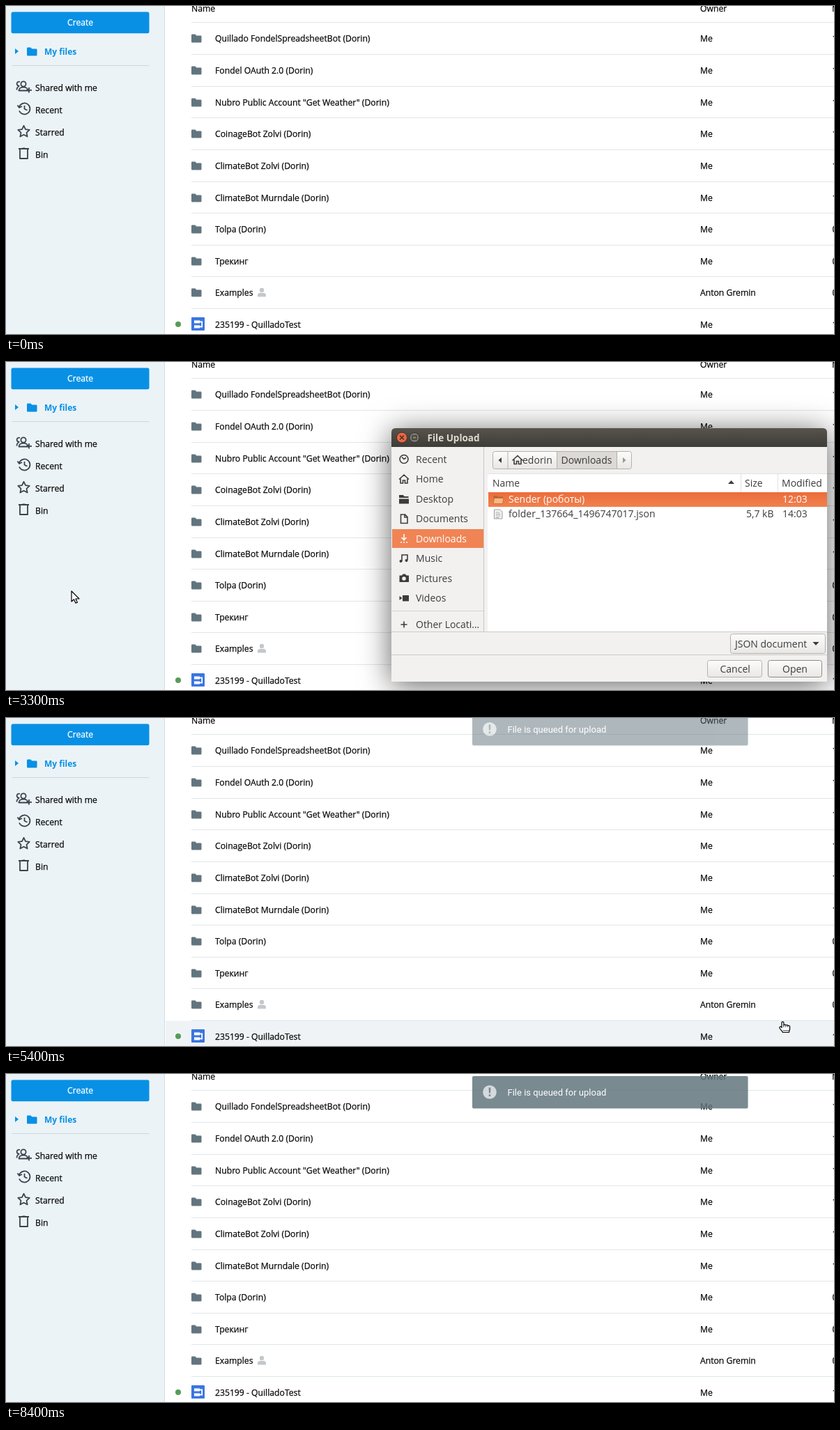
Recreate the animation shown at these times as an HTML page. Size 1188 px wide and 471 px high, loop 9 s.

```html
<!DOCTYPE html>
<html lang="en">
<head>
<meta charset="utf-8">
<title>Upload from file</title>
<style>
  html, body { margin: 0; width: 100%; height: 100%; overflow: hidden; background: #fff; }
  svg { display: block; width: 1188px; height: 471px; }
  text { font: 12.2px "Open Sans", "Noto Sans", sans-serif; color: #0a0a0a; fill: currentColor; stroke: currentColor; stroke-width: .25; white-space: pre; }
  .bold { font-weight: 700; font-size: 12px; color: #0890e5; stroke-width: 0; }
  .white { color: #fff; }
  .line { fill: none; stroke: #39434a; stroke-width: 1.8; stroke-linejoin: round; }
  .solid { fill: #39434a; }
  #menu text { color: #3c464c; }
  #menuBox { filter: drop-shadow(0 2px 3px rgba(0, 0, 0, .32)); }
  #dialogBox { filter: drop-shadow(0 5px 22px rgba(0, 0, 0, .62)); }
  #dialog text { font-size: 14px; color: #3c3c3c; stroke-width: 0; }
  #dialog .title { font-weight: 700; font-size: 13.5px; color: #dfdbd2; }
  #dialog .sel text, #dialog text.white { color: #fff; }
  .btn { fill: url(#btnFill); stroke: #b5b0aa; }
  .gtk { fill: none; stroke: #3c3c3c; stroke-width: 1.6; }
  #toast text { font: 13px Roboto, sans-serif; color: #fff; stroke-width: 0; }
</style>
</head>
<body>
<svg viewBox="0 0 1188 471">
  <defs>
    <linearGradient id="bar" x2="0" y2="1"><stop stop-color="#57544c"/><stop offset="1" stop-color="#3e3c37"/></linearGradient>
    <linearGradient id="btnFill" x2="0" y2="1"><stop stop-color="#fcfcfb"/><stop offset="1" stop-color="#e9e7e5"/></linearGradient>
    <linearGradient id="pick" x2="0" y2="1"><stop stop-color="#ec6c3a"/><stop offset="1" stop-color="#f0814f"/></linearGradient>
    <clipPath id="places"><path d="M554 122h132v265H554z"/></clipPath>
    <path id="folder" d="M0 1.2Q0 0 1.2 0H5.5L7.2 2H13.3Q14.5 2 14.5 3.2V10.8Q14.5 12 13.3 12H1.2Q0 12 0 10.8z"/>
    <path id="process" d="M0 0H11V5H0zM0 9H11V14H0zM11 2.5H15V11.5H11"/>
  </defs>

  <rect id="rowHover" x="229" width="959" height="44.6" fill="#eff3f6"/>
  <g id="list"></g>

  <g id="sidebar">
    <path d="M0 0h228v471H0z" fill="#ebf3f7"/>
    <path d="M227.5 0v471" stroke="#d3dde2"/>
    <rect id="create" x="7.5" y="8.5" width="198" height="30.7" rx="2.5"/>
    <text class="white" x="88" y="28.3">Create</text>
    <path d="M13 61l5 4-5 4z" fill="#0890e5"/>
    <use href="#folder" x="30" y="59.5" fill="#0890e5"/>
    <text class="bold" x="55" y="70">My files</text>
    <path d="M8 85.5h197" stroke="#cbd8de"/>
    <g class="line">
      <circle cx="25" cy="112" r="3.6"/>
      <path d="M18.5 121.5c0-6.5 13-6.5 13 0zM20 109a3 3 0 1 0-.5 5.5M15.5 120.5c0-3 1-4.5 3-5M33 117v7.5M29 120.8h8"/>
      <path d="M19 150.5a8 8 0 1 0 0-6M16.5 142.5l2.5 3.5 4-2M26.5 143v4.800l4 2"/>
      <path id="star"/>
      <path d="M18 205h15M20 205v14h11v-14M23.5 204.5h4"/>
    </g>
  </g>

  <g id="menu">
    <rect id="menuBox" x="8" y="43" width="197" height="310" rx="2" fill="#fff"/>
    <rect id="itemHover" x="8" width="197" height="42" fill="#eef3f5"/>
    <path d="M8 218.5h197M8 260.5h197M8 303.5h197" stroke="#dde5e9"/>
    <g class="line">
      <path d="M31.5 64h5l2 2.5h8.5v9.5H31.5z"/>
      <use href="#process" x="31" y="104.5"/>
      <path d="M32.5 161v-14.5h12.5l-2.5 4.5 2.5 4.5H32.5"/>
      <path d="M39 187v8h8M39 187a8 8 0 1 0 8 8a8 8 0 0 0-8-8"/>
      <path d="M32.5 234h16v10.5h-16zM37.5 234v-2.5h6v2.5M32.5 239.5h16M39 239.5v2h3v-2"/>
      <path d="M34 315.5h7.5l4.5 4.5v10H34zM41 316v4.5h5"/>
    </g>
    <g class="solid">
      <path d="M37.8 272.5h2v3h4.2q1.5 0 1.5 1.5v9q0 1.5-1.5 1.5H33.5q-1.5 0-1.5-1.5v-9q0-1.5 1.5-1.5h4.3zM29.5 279h2v6h-2zM46 279h2v6h-2zM34 288.5h2v2h-2zM38 288.5h2v2h-2zM42 288.5h2v2h-2z"/>
      <path d="M35 278.5h2.5v3H35zM40.5 278.5H43v3h-2.5zM35.5 284h7v1.3h-7z" fill="#fff"/>
    </g>
  </g>

  <g id="dialog">
    <path id="dialogBox" d="M553 459V101q0-6 6-6h613q6 0 6 6v358z" fill="#f2f1f0"/>
    <path d="M553 122v-21q0-6 6-6h613q6 0 6 6v21z" fill="url(#bar)"/>
    <circle cx="568" cy="108.5" r="7.5" fill="#ee6841" stroke="#35332f"/>
    <path d="M565 105.5l6 6m0-6l-6 6" stroke="#48302a" stroke-width="1.6"/>
    <circle cx="586" cy="108.5" r="7" fill="#7c7971" stroke="#35332f"/>
    <path d="M583 106h6v5h-6z" fill="none" stroke="#3c3a35" stroke-width="1.3"/>
    <text class="title" x="604.5" y="113.5">File Upload</text>

    <g clip-path="url(#places)">
      <path d="M554 240h131.5v27H554z" fill="#f08455"/>
      <path d="M554 357.5h131" stroke="#d5d1cd"/>
      <g id="placeNames"></g>
      <g class="gtk">
        <circle cx="571" cy="139.5" r="6"/><path d="M568 136.5l3 3 3-2"/>
        <path d="M564 168.5l7-6.5 7 6.5M566 167.5v6.5h3.5v-4h3v4h3.5v-6.5"/>
        <path d="M566.5 219h6l3.5 3.5v9h-9.5zM572 219.5v3.5h4"/>
        <path d="M568 286v-9h8v7.5"/>
        <path d="M571 372.5v9M566.5 377h9"/>
        <path d="M571 247v8M567.5 252l3.5 3.5 3.5-3.5M566 259h2M570 259h2M574 259h2" stroke="#fff"/>
      </g>
      <path d="M564 191h6l1.5 2h6v2H564zM564 196.5h14v7h-14zM564.5 306.5h3.5l1.5-2h3.5l1.5 2h3.5v9.5h-13.5zM564.5 336l4 3-4 3zM569 335h9v8.5h-9z" fill="#3c3c3c"/>
      <circle cx="571" cy="311" r="2.8" fill="#f2f1f0"/>
      <circle cx="566.5" cy="286" r="2" fill="#3c3c3c"/><circle cx="574.5" cy="285" r="2" fill="#3c3c3c"/>
    </g>
    <path d="M685.5 122v265" stroke="#c9c5c0"/>
    <rect id="edge" x="682" y="122" width="4" height="260" fill="#f08a60"/>

    <rect class="btn" x="698.5" y="128.5" width="199" height="25" rx="3"/>
    <path d="M790.5 129h86v24h-86z" fill="#dcd9d6"/>
    <path d="M720 129v24M790.5 129v24M876.5 129v24" stroke="#b5b0aa"/>
    <path d="M711 137v8l-4.5-4z" fill="#3c3c3c"/><path d="M885 137v8l4.5-4z" fill="#9a9792"/>
    <path class="gtk" d="M726.5 141.5l7.5-7 7.5 7M729 140v6.5h3.5v-4h3v4h3.5V140"/>
    <text x="741" y="146">edorin</text>
    <text x="796.5" y="146">Downloads</text>

    <path d="M691 160h487v227H691z" fill="#fff"/>
    <path d="M691 160.5h487M691 187.5h487M1054.5 161v26M1107.5 161v26" stroke="#e4e2df"/>
    <path d="M1036 175h9l-4.5-5z" fill="#3c3c3c"/>
    <text x="698" y="178.5">Name</text><text x="1060" y="178.5">Size</text><text x="1113" y="178.5">Modified</text>
    <rect id="pickRow" x="692" width="486" height="21" fill="url(#pick)"/>
    <g id="entry0"><text x="721" y="202">Sender (роботы)</text><text x="1114" y="202">12:03</text></g>
    <g id="entry1"><text x="721" y="223">folder_137664_1496747017.json</text><text x="1062" y="223">5,7 kB</text><text x="1114" y="223">14:03</text></g>
    <path d="M699.5 192h5l1 1.5h7.5v3h-13.5z" fill="#b8662f"/>
    <path d="M699 203.5l1.5-8h13.5l-1.5 8z" fill="#f6b784" stroke="#c9723a"/>
    <path d="M700.5 212h8l3.5 3v10h-11.5z" fill="#f4f4f2" stroke="#9b9b98"/>
    <path d="M702.5 216h6M702.5 218.5h7M702.5 221h7M702.5 223.5h5" stroke="#a9a9a6"/>

    <path d="M553 387.5h625M553 420.5h625" stroke="#cdc9c4"/>
    <rect class="btn" x="1039.5" y="390.5" width="136" height="28" rx="3"/>
    <text x="1046" y="409.5">JSON document</text>
    <path d="M1157.5 402h9l-4.5 5z" fill="#3c3c3c"/>
    <rect class="btn" x="1006.5" y="428.5" width="78" height="24" rx="3"/>
    <text x="1024.5" y="445.5">Cancel</text>
    <rect class="btn" x="1093.5" y="428.5" width="77" height="24" rx="3" style="stroke:#8f8a84"/>
    <text x="1114" y="445.5">Open</text>
  </g>

  <g id="toast">
    <rect x="669" y="3" width="395.6" height="46.4" rx="2" fill="#60747c"/>
    <circle cx="694" cy="26" r="9.8" fill="#ccd4d7"/>
    <path d="M692.6 19.5h2.8l-.4 8h-2zM692.7 29.5h2.6v2.6h-2.6z" fill="#60747c"/>
    <text x="719.5" y="30.5">File is queued for upload</text>
  </g>

  <g id="cursor" fill="#fff" stroke="#000" stroke-linejoin="round" stroke-width="1.2">
    <path id="arrow" d="M0 0V15L3.5 11.8 6 17.3 8.400 16.2 6 11H11z"/>
    <g id="hand">
      <path d="M-2 7.500V1.500C-2-.3 .9-.3 .9 1.500V5C2 3.900 3.700 4.200 3.900 5.200C5 4.400 6.600 4.800 6.800 5.800C8 5.200 9.600 5.700 9.600 7V10.500C9.600 12.500 8.500 13 8.500 15.500H-.5C-1 13.500-3.500 12-5 9.500C-5.800 7.800-3.800 6.600-2.800 7.600L-2 8.500z"/>
      <path d="M.9 5v3M3.900 5.500v2.500M6.800 6v2M-.5 13h9" stroke-width=".8"/>
    </g>
  </g>
</svg>
<script>
const $ = id => document.getElementById(id);
const label = (x, y, s) => `<text x="${x}" y="${y}">${s}</text>`;
const show = (id, on) => $(id).style.display = on ? '' : 'none';

const LOOP = 9000, STEP = 100, TOP = 23.49, PITCH = 45.62;
const rowLine = i => Math.round(TOP + i * PITCH);

// File list
const names = ['Quillado FondelSpreadsheetBot (Dorin)', 'Fondel OAuth 2.0 (Dorin)',
  'Nubro Public Account "Get Weather" (Dorin)', 'CoinageBot Zolvi (Dorin)', 'ClimateBot Zolvi (Dorin)',
  'ClimateBot Murndale (Dorin)', 'Tolpa (Dorin)', 'Трекинг', 'Examples', '235199 - QuilladoTest'];
const dates = '1111110001';
let html = label(266, 7.5, 'Name') + label(996, 7.5, 'Owner') + label(1185, 7.5, 'M');
names.forEach((name, i) => {
  const y = rowLine(i) + 23.5;
  html += `<path d="M266 ${rowLine(i) + .5}H1188" stroke="#dfe6e9"/>`
    + label(300, y + 4.5, name) + label(996, y + 4.5, i === 8 ? 'Anton Gremin' : 'Me')
    + label(1185.5, y + 4.5, dates[i]);
  if (i < 9) html += `<use href="#folder" x="266" y="${y - 6}" fill="#62757f"/>`;
});
html += `<circle cx="367" cy="408" r="3.2" fill="#c3c8cb"/>
  <path d="M361 417.5v-2q0-3.5 3.5-3.5h5q3.5 0 3.5 3.5v2z" fill="#c3c8cb"/>
  <circle cx="247" cy="457" r="4" fill="#579c57"/>
  <rect x="266" y="447" width="19" height="19" rx="1" fill="#3a75e2"/>
  <path d="M270 451.5h8v4h-8zM270 458.5h8v4h-8z" fill="#fff"/>
  <path d="M278 453.5h3.2v7H278" fill="none" stroke="#fff" stroke-width="1.8"/>`;
$('list').innerHTML = html;

// Sidebar, menu and dialog labels
$('sidebar').insertAdjacentHTML('beforeend',
  ['Shared with me', 'Recent', 'Starred', 'Bin'].map((s, i) => label(42, 121.5 + i * 32.2, s)).join(''));
$('star').setAttribute('d', 'M' + Array.from({ length: 10 }, (_, i) => {
  const a = i * Math.PI / 5, r = i % 2 ? 4.2 : 8.6;
  return [25.5 + r * Math.sin(a), 180.5 - r * Math.cos(a)].map(v => v.toFixed(1));
}).join('L') + 'z');

const itemTops = [49, 91, 133, 176, 219, 261, 304];
const items = ['Folder', 'Process', 'The state diagram', 'Dashboard', 'Company', 'Bot platform', 'From file'];
$('menu').insertAdjacentHTML('beforeend',
  items.map((s, i) => label(62, 74.2 + i * 42.25, s)).join(''));

const places = ['Recent', 'Home', 'Desktop', 'Documents', 'Downloads', 'Music', 'Pictures', 'Videos'];
$('placeNames').innerHTML = label(588, 382, 'Other Locati…')
  + places.map((s, i) => label(588, 144.5 + i * 28.5, s)).join('');
$('placeNames').children[5].classList.add('white');

// Pointer path: time, x, y
const path = [[500, 205, -18], [1000, 107, 18], [1700, 107, 18], [2300, 102, 188], [2900, 94, 329],
  [3300, 94, 329], [4100, 808, 218], [4200, 806, 215], [4300, 806, 215], [5200, 1115, 436],
  [5400, 1115, 436], [5800, 843, 343.5], [7200, 843, 343.5], [8200, 444, -7], [8400, 298, -22]];

function pointer(t) {
  if (t <= path[0][0]) return path[0].slice(1);
  const i = path.findIndex(p => p[0] >= t);
  if (i < 0) return path[path.length - 1].slice(1);
  const [t0, x0, y0] = path[i - 1], [t1, x1, y1] = path[i];
  const k = (t - t0) / (t1 - t0);
  return [x0 + (x1 - x0) * k, y0 + (y1 - y0) * k];
}

function draw(now) {
  const t = Math.floor(now % LOOP / STEP) * STEP;
  const [x, y] = pointer(t);
  const menu = t >= 1500 && t < 3200;
  const dialog = t >= 3300 && t < 5300;
  const onButton = x >= 8 && x <= 205 && y >= 9 && y < 39;
  const onRow = !dialog && x > 228 && y >= TOP;
  const item = menu ? itemTops.findLastIndex(top => y >= top) : -1;

  $('cursor').setAttribute('transform', `translate(${Math.round(x)} ${Math.floor(y)})`);
  const hand = onButton || onRow || menu;
  show('hand', hand);
  show('arrow', !hand);

  $('create').setAttribute('fill', !onButton ? '#0890e5' : t >= 1300 && t < 1500 ? '#077fcb' : '#0788d9');
  show('menu', menu);
  show('itemHover', item >= 0);
  if (item >= 0) $('itemHover').setAttribute('y', itemTops[item]);
  show('rowHover', onRow);
  if (onRow) $('rowHover').setAttribute('y', rowLine(Math.floor((y - TOP) / PITCH)) + 1);

  show('dialog', dialog);
  show('edge', x > 600);
  const picked = t < 4200 ? 0 : 1;
  $('pickRow').setAttribute('y', 187 + picked * 21);
  [0, 1].forEach(i => $('entry' + i).setAttribute('class', i === picked ? 'sel' : ''));

  const k = Math.min(1, Math.max(0, (t - 5400) / 300));
  show('toast', t >= 5400);
  $('toast').setAttribute('transform', `translate(0 ${Math.round(-10 * (1 - k))})`);
  $('toast').setAttribute('opacity', 0.5 + 0.34 * k);
}

function tick() {
  draw(performance.now());
  requestAnimationFrame(tick);
}
tick();
</script>
</body>
</html>
```
